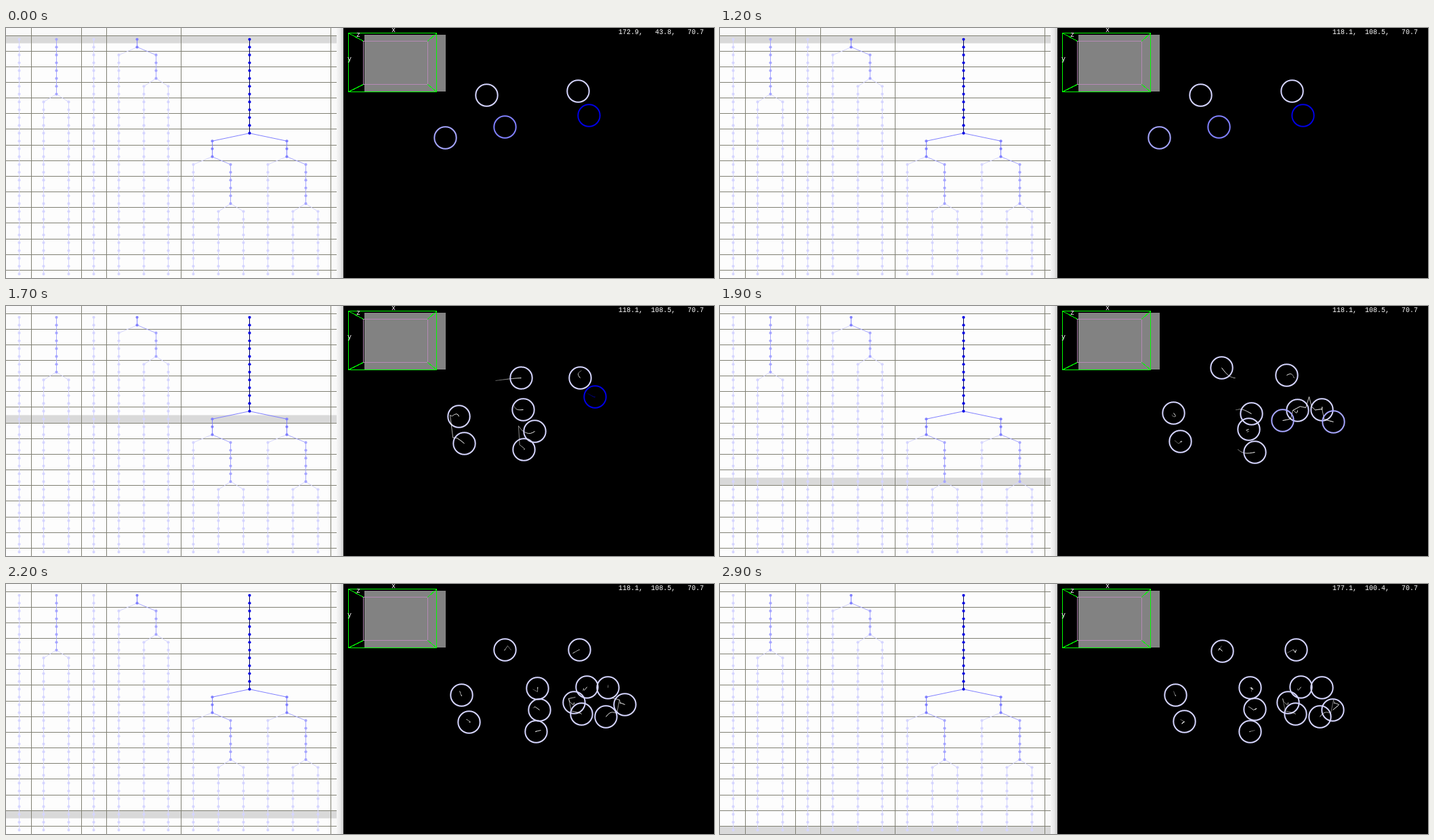
An HTML page for the animation above (3.3 s loop, 1045 by 370 pixels).

```html
<!DOCTYPE html>
<html lang="en">
<head>
<meta charset="utf-8">
<title>Cell lineage</title>
<style>
  html, body { margin: 0; width: 100%; height: 100%; overflow: hidden; background: #000; }
  svg { display: block; width: 1045px; height: 370px; }
  text { font: 10px "Liberation Mono", monospace; fill: #fff; white-space: pre; }
</style>
</head>
<body>
<svg viewBox="0 0 1045 370">
  <defs>
    <linearGradient id="edge">
      <stop offset="0" stop-color="#f6f6f6"/>
      <stop offset=".6" stop-color="#e8e8e8"/>
      <stop offset="1" stop-color="#c4c4c4"/>
    </linearGradient>
  </defs>
  <rect width="1045" height="370" fill="#000"/>
  <rect width="488" height="370" fill="#fdfdfd"/>
  <rect width="488" height="11" fill="#f9f9f9"/>
  <rect x="480" width="8" height="370" fill="#f9f9f9"/>
  <rect x="488" width="10" height="370" fill="url(#edge)"/>
  <rect id="band" width="488" height="11.6" fill="#d9d9d9"/>
  <path id="grid" stroke="#7f7f72" shape-rendering="crispEdges"/>
  <g id="tree"></g>

  <rect x="529" y="10" width="120" height="84" fill="#828282"/>
  <g fill="none" stroke="#0f0" shape-rendering="crispEdges">
    <path d="M527.5 19.5H622.5V83.5H527.5Z" stroke="#b58ab5"/>
    <path d="M505.5 7.5H635.5V94.5H505.5Z"/>
    <path d="M505.5 7.5L527.5 19.5M505.5 94.5L527.5 83.5M635.5 7.5L622.5 19.5M635.5 94.5L622.5 83.5"/>
  </g>
  <text x="569" y="6">x</text>
  <text x="517" y="13">z</text>
  <text x="504" y="49">y</text>
  <text id="coords" x="904" y="9"></text>
  <g id="view" fill="none" transform="translate(.5 .5)"></g>
</svg>
<script>
const $ = id => document.getElementById(id);
const LOOP = 3300, TICK = 100, TAIL = 9;
const TOP = 11, ROW = 11.5775, LAST = 30, COLUMN = 36.77;
const BLUE = '#0000e4';
const SHADES = ['#d5d5ff', '#a6a6ff', '#8080ff', BLUE];   // by generations still to come
const KEYS = [0, 3, 12, 20, 27, 29];                      // rows at which key points apply
const SCROLL = [0, 1, 1, 4, 8, 13, 17, 21, 24, 26, 28, 28, 29, 30];  // one row per tick
const SCROLL_START = 1200;

const dotY = row => TOP + ROW * (row + .5);
const mix = (a, b, k) => a + (b - a) * k;
const clamp = (v, lo, hi) => Math.min(hi, Math.max(lo, v));

const leaf = (...points) => ({ last: LAST, points, kids: [], height: 0 });
const split = (last, points, ...kids) =>
  ({ last, points, kids, height: 1 + Math.max(...kids.map(k => k.height)) });

const roots = [
  leaf([709,99], [722,110], [760,106], [740,91], [736,97], [741,99]),
  split(7, [[648,162], [655,161]],
    leaf([668,163], [669,158], [672,164]),
    leaf([676,203], [679,200], [683,204], [685,203])),
  leaf([844,93], [849,95], [847,106], [836,102], [846,97], [850,97]),
  split(1, [[736,146]],
    leaf([749,146], [763,153], [784,159], [784,154], [782,153]),
    split(5, [[756,177]],
      leaf([780,185], [780,182], [787,186], [789,185]),
      leaf([764,212], [789,216], [782,218]))),
  split(12, [[860,129], [858,129], [869,134]],
    split(15, [[845,154]],
      leaf([852,154], [857,152]),
      split(21, [[830,169]], leaf([838,175]), leaf([849,192]))),
    split(15, [[888,152]],
      leaf([888,153]),
      split(21, [[905,171]], leaf([885,196]), leaf([913,178], [904,186]))))
];

// Lay out columns: leaves evenly spaced, each parent centred over its two children.
const cells = [], borders = [];
let leaves = 0;
function grow(c, first = 0, parent = null) {
  cells.push(c);
  const rows = KEYS.filter(r => r >= first && r <= c.last);
  c.path = c.points.map(([x, y], i) => ({ row: rows[i] ?? c.last, x, y }));
  if (parent) {
    // daughters part mostly vertically
    const from = parent.path.at(-1), to = c.path[0];
    c.path.unshift({ row: first, x: mix(from.x, to.x, .2), y: mix(from.y, to.y, .8) });
  }
  Object.assign(c, { first, parent, color: SHADES[c.height] });
  c.kids.forEach(k => grow(k, c.last + 1, c));
  c.col = c.kids.length ? (c.kids[0].col + c.kids[1].col) / 2 : 19.2 + COLUMN * leaves++;
}
for (const root of roots) {
  grow(root);
  borders.push(Math.floor(COLUMN * leaves + 1));
}

// Each leg between key points bows sideways a little.
function position(c, row) {
  while (row < c.first && c.parent) c = c.parent;
  const i = c.path.findIndex(p => p.row >= row);
  if (i < 0) return c.path.at(-1);
  const b = c.path[i], a = c.path[i - 1] ?? b;
  const k = a === b ? 1 : (row - a.row) / (b.row - a.row);
  const bow = 4 * Math.sin(Math.PI * k), angle = c.col + b.row;
  return { x: mix(a.x, b.x, k) + bow * Math.cos(angle), y: mix(a.y, b.y, k) + bow * Math.sin(angle) };
}

function drawTree() {
  let grid = borders.map(x => `M${x}.5 0V370`).join('');
  for (let y = TOP; y < 370; y += 2 * ROW) grid += `M0 ${Math.floor(y)}.5H488`;
  $('grid').setAttribute('d', grid);

  let lines = '', dots = '';
  for (const { col, first, last, color, parent } of cells) {
    const x = Math.floor(col) + .5;
    const ink = color === BLUE ? '#000050' : color;
    if (parent) lines += `<path d="M${parent.col} ${dotY(parent.last)}L${x} ${dotY(first)}" stroke="${color}"/>`;
    lines += `<path d="M${x} ${dotY(first)}V${dotY(last)}" stroke="${ink}"/>`;
    for (let row = first; row <= last; row++)
      dots += `<circle cx="${x}" cy="${dotY(row)}" r="2.1" fill="${color}"/>`;
  }
  $('tree').innerHTML = lines + dots;
}

function trail(c, row) {
  const ink = c.color === BLUE ? BLUE : '#fff';
  let out = '';
  for (let age = 0; age < TAIL && age < row; age++) {
    const a = position(c, row - age), b = position(c, row - age - 1);
    out += `<path d="M${a.x} ${a.y}L${b.x} ${b.y}" stroke="${ink}" opacity="${1 - .7 * age / TAIL}"/>`;
  }
  return out;
}

function drawView(row) {
  $('view').innerHTML = cells.filter(c => row >= c.first && row <= c.last).map(c => {
    const { x, y } = position(c, row);
    return trail(c, row) + `<circle cx="${x}" cy="${y}" r="16.2" stroke="${c.color}" stroke-width="2"/>`;
  }).join('');
}

function readout(tick) {
  if (tick < 1) return [172.9, 43.8];
  const k = clamp((tick - 26) / 3, 0, 1);
  return [mix(118.1, 177.1, k), mix(108.5, 100.4, k)];
}

let shown;
function render(t) {
  const tick = Math.floor(t / TICK);
  if (tick === shown) return;
  shown = tick;
  const row = SCROLL[clamp(tick - SCROLL_START / TICK, 0, SCROLL.length - 1)];
  const [x, y] = readout(tick);
  $('coords').textContent = `${x.toFixed(1)},${y.toFixed(1).padStart(7)},   70.7`;
  $('band').setAttribute('y', TOP + ROW * row);
  drawView(Math.max(0, row - 1));   // the view lags the band by one row
}

drawTree();
const start = performance.now();
function loop() {
  render((performance.now() - start) % LOOP);
  requestAnimationFrame(loop);
}
loop();
</script>
</body>
</html>
```
